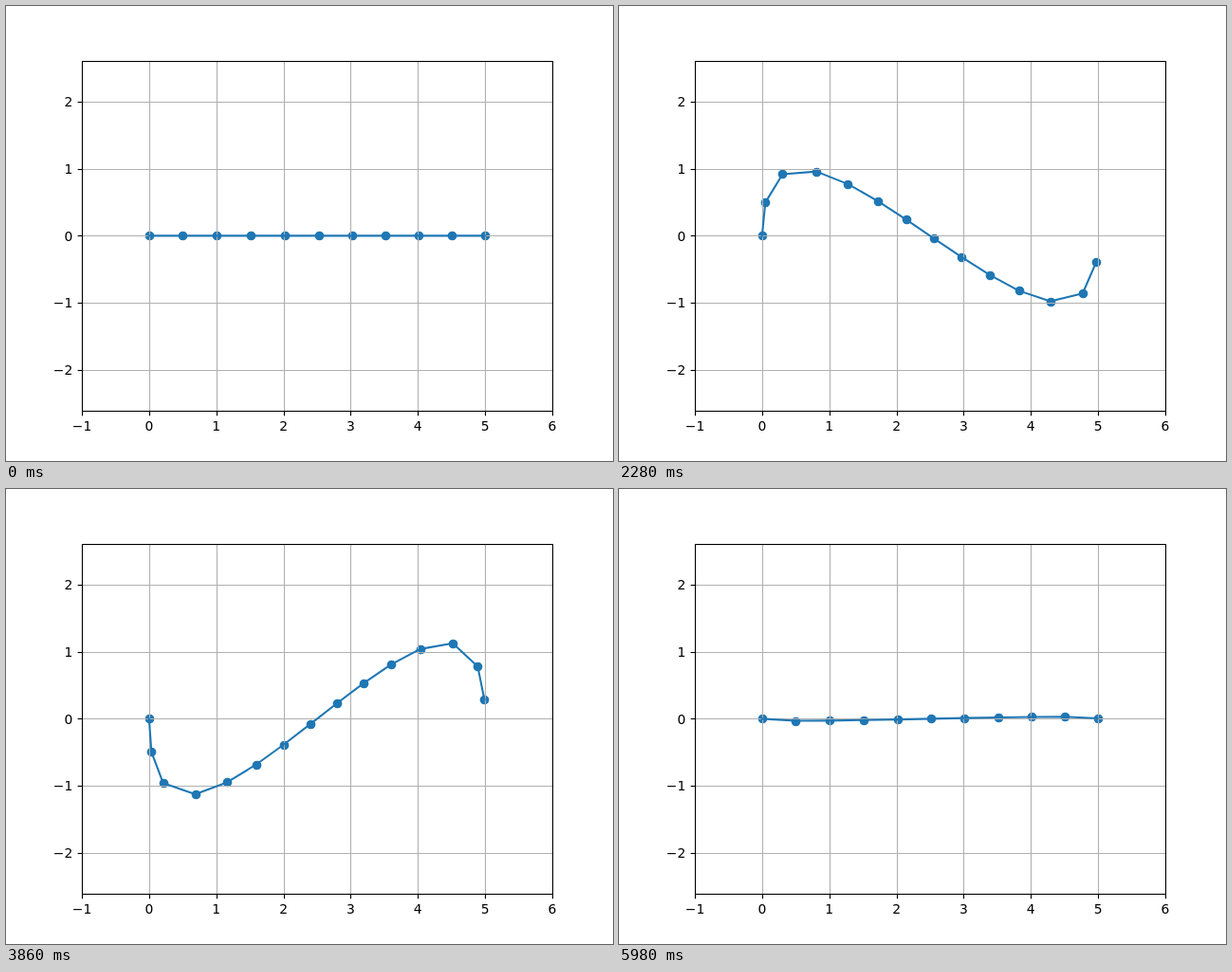
An HTML page that plays this animation: 640x480 px, repeating every 6 s.

```html
<!DOCTYPE html>
<html lang="en">
<head>
<meta charset="utf-8">
<title>Evenly spaced points on a curve</title>
<style>
  html, body { margin: 0; width: 100%; height: 100%; overflow: hidden; background: #fff; }
  svg { display: block; width: 640px; height: 480px; }
  text { font: 13.89px "DejaVu Sans", sans-serif; fill: #000; }
  #grid { stroke: #b0b0b0; stroke-width: 1.11; }
  #axes { stroke: #000; stroke-width: 1.11; fill: none; }
  #dots { fill: #1f77b4; }
  #line { fill: none; stroke: #1f77b4; stroke-width: 2.083; stroke-linejoin: round; stroke-linecap: square; }
</style>
</head>
<body>
<svg viewBox="0 0 640 480">
  <g id="dots"></g>
  <g id="grid"></g>
  <polyline id="line"/>
  <g id="axes"><rect x="80.5" y="58.5" width="496" height="369"/></g>
  <g id="labels"></g>
</svg>
<script>
const LOOP = 6000, TICK = 20, SCALE = 496 / 7;
const SPACING = 0.5, TOLERANCE = 0.0055, SCAN = 0.004;
const byId = id => document.getElementById(id);
const px = x => 80 + (x + 1) * SCALE;
const py = y => 242.4 - y * SCALE;
const snap = v => Math.floor(v + 0.5) + 0.5;

function add(parent, tag, attrs, text) {
  const el = document.createElementNS("http://www.w3.org/2000/svg", tag);
  for (const name in attrs) el.setAttribute(name, attrs[name]);
  if (text !== undefined) el.textContent = text;
  return byId(parent).appendChild(el);
}

function drawAxes() {
  const label = n => String(n).replace("-", "\u2212");
  for (let n = -1; n <= 6; n++) {
    const x = snap(px(n));
    if (n > -1 && n < 6) add("grid", "line", { x1: x, x2: x, y1: 58, y2: 427 });
    add("axes", "line", { x1: x, x2: x, y1: 427.5, y2: 432.3 });
    add("labels", "text", { x: px(n), y: 448, "text-anchor": "middle" }, label(n));
  }
  for (let n = -2; n <= 2; n++) {
    const y = snap(py(n));
    add("grid", "line", { x1: 80, x2: 576, y1: y, y2: y });
    add("axes", "line", { x1: 75.6, x2: 80.5, y1: y, y2: y });
    add("labels", "text", { x: 70.3, y: Math.round(py(n) + 5.2), "text-anchor": "end" }, label(n));
  }
}

// Cubic Bezier through (0,0), (0,h), (5,-h), (5,0)
const curve = (s, h) => [5 * s * s * (3 - 2 * s), 3 * h * s * (1 - s) * (1 - 2 * s)];
const speed = (s, h) => Math.hypot(30 * s * (1 - s), 3 * h * (1 - 6 * s * (1 - s)));

// First parameter after s whose straight distance from s reaches d, or null
function advance(s, d, h) {
  const [x0, y0] = curve(s, h);
  const reached = u => {
    const [x, y] = curve(u, h);
    return Math.hypot(x - x0, y - y0) >= d;
  };
  let lo = s, hi = s;
  while (!reached(hi)) {
    if (hi >= 1) return null;
    lo = hi;
    hi = Math.min(1, hi + SCAN);
  }
  for (let i = 0; i < 16; i++) {
    const mid = (lo + hi) / 2;
    if (reached(mid)) hi = mid; else lo = mid;
  }
  return hi;
}

// Steps run slightly long while the curve speeds up and short while it slows down
function spacedPoints(h) {
  const points = [curve(0, h)];
  let s = 0;
  while (points.length < 30) {
    let bias = -Math.abs(h) / 5;
    if (s > 0) {
      const guess = advance(s, SPACING, h) ?? 1;
      bias = Math.max(-1, Math.min(1, 8 * (speed(guess, h) - speed(s, h))));
    }
    s = advance(s, SPACING + TOLERANCE * bias, h);
    if (s === null) break;
    points.push(curve(s, h));
  }
  return points;
}

const dots = Array.from({ length: 20 }, () => add("dots", "circle", { r: 4.86 }));

function render(ms) {
  const time = Math.floor((ms % LOOP) / TICK) * TICK;
  const points = spacedPoints(5 * Math.sin(2 * Math.PI * time / LOOP));
  byId("line").setAttribute("points", points.map(([x, y]) => `${px(x)},${py(y)}`).join(" "));
  dots.forEach((dot, i) => {
    const point = points[i];
    dot.setAttribute("visibility", point ? "visible" : "hidden");
    if (!point) return;
    dot.setAttribute("cx", snap(px(point[0])));
    dot.setAttribute("cy", snap(py(point[1])));
  });
}

drawAxes();
render(0);
const start = performance.now();
(function loop() {
  render(performance.now() - start);
  requestAnimationFrame(loop);
})();
</script>
</body>
</html>
```
